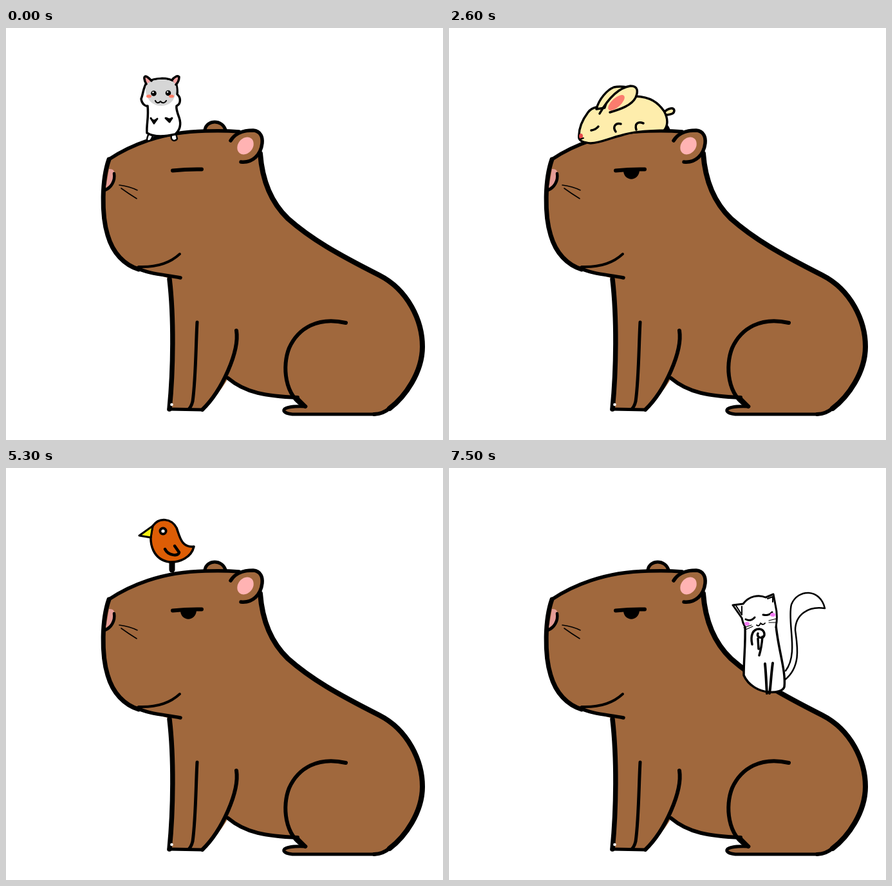
These frames come from a looping animation (679 px wide and 640 px high, 8700 ms). An HTML page:

```html
<!DOCTYPE html>
<html lang="en">
<head>
<meta charset="utf-8">
<title>Capybara and friends</title>
<style>
html, body { margin: 0; width: 100%; height: 100%; overflow: hidden; background: #fff; }
svg { display: block; width: 679px; height: 640px; }
path, ellipse, circle { stroke-linecap: round; stroke-linejoin: round; }
.ink { stroke: #000; }
.line { fill: none; stroke: #000; }
.bare { stroke: none; }

/* hard cuts: every value holds until the next key */
.cut { opacity: 0; animation: 8.7s step-end infinite; }
.eye { animation-name: eye; }
.hamster { animation-name: hamster; }
.turtle { animation-name: turtle; }
.bunny { animation-name: bunny; }
.baby { animation-name: baby; }
.bird { animation-name: bird; }
.chirp { animation-name: chirp; }
.cat { animation-name: cat; }
@keyframes eye {
  0%, 57.471%, 83.908% { opacity: 0; }
  2.299%, 60.92%, 86.207%, 100% { opacity: 1; }
}
@keyframes hamster { 0% { opacity: 1; } 16.092%, 100% { opacity: 0; } }
@keyframes turtle { 0%, 29.885%, 100% { opacity: 0; } 16.092% { opacity: 1; } }
@keyframes bunny { 0%, 43.678%, 100% { opacity: 0; } 29.885% { opacity: 1; } }
@keyframes baby { 0%, 60.92%, 100% { opacity: 0; } 43.678% { opacity: 1; } }
@keyframes bird { 0%, 74.713%, 100% { opacity: 0; } 60.92% { opacity: 1; } }
@keyframes chirp { 0%, 83.908%, 100% { opacity: 0; } 74.713% { opacity: 1; } }
@keyframes cat { 0% { opacity: 0; } 83.908%, 100% { opacity: 1; } }
</style>
</head>
<body>
<svg viewBox="0 0 679 640">
  <g class="cut baby ink" stroke-width="3.5" fill="#cf966a">
    <path d="M464 163C466 157 478 157 480 163"/>
    <path d="M417 180C434 168 458 161 484 164L496 178C500 200 517 221 540 232C562 243 573 252 572 270C571 296 555 320 545 357L536 357L530 354C526 340 532 330 527 317C508 316 490 307 478 295L467 309L454 307C454 280 453 260 451 242C432 241 420 230 417 214C415 203 414 190 417 180Z"/>
    <path class="line" d="M463 262C464 280 463 295 460 308M488 265C486 282 480 292 468 309M478 295C490 309 510 317 537 321M536 300C539 318 538 335 535 357M545 357C552 330 557 318 565 300M438 239L454 241M432 233Q439 236 446 234"/>
    <path d="M482 167C484 161 497 162 497 169C497 176 491 180 486 179"/>
    <ellipse class="bare" cx="489" cy="171.500" rx="4" ry="5" transform="rotate(25 489 171.500)" fill="#ffb3b3"/>
    <path class="line" d="M450 183L467 182"/>
    <circle class="bare" cx="460" cy="185" r="3.500" fill="#000"/>
    <path class="line" d="M417 192Q423 191 422 185"/>
    <path class="line" stroke-width="1" d="M424 191L433 194M424 193L432 199"/>
  </g>

  <g id="capybara">
    <path class="ink" fill="#a0683d" stroke-width="5" d="M309 158C312 142 336 142 341 158"/>
    <path fill="#a0683d" d="M160 204C190 184 240 161 310 160L360 160L394 195C398 236 411 270 438 296C474 328 515 351 580 384C625 407 647 455 647 495C647 535 620 573 596 591Q585 600 572 600L445 600C425 597 430 586 465 588L453 575C415 574 380 569 345 544C335 562 320 580 305 593L254 592C260 540 261 450 254 389L206 375C184 368 166 350 158 322C148 290 149 235 160 204Z"/>
    <path class="line" stroke-width="5.500" d="M160 204C190 184 240 161 310 160Q340 159 362 161"/>
    <path class="line" stroke-width="7" d="M160 204C149 235 148 290 158 322C166 350 184 368 206 375"/>
    <path class="line" stroke-width="5.500" d="M204 373C222 382 245 383 271 388"/>
    <path class="line" stroke-width="8" d="M395 195C398 236 411 270 438 296C474 328 515 351 580 384C625 407 647 455 647 495C647 535 620 573 596 591"/>
    <path class="line" stroke-width="6" d="M597 590Q585 600 572 600"/>
    <path class="line" stroke-width="5" d="M573 600L445 600C425 598 424 586 466 588L453 575"/>
    <path class="line" stroke-width="6" d="M345 544C372 567 405 572 453 574"/>
    <path class="line" stroke-width="7.500" d="M254 390C261 450 260 530 254 592"/>
    <path class="line" stroke-width="5" d="M253 592L305 593M297 457C295 490 295 545 290 580Q288 588 284 592"/>
    <path class="line" stroke-width="6" d="M358 470C363 502 336 563 305 593"/>
    <path class="line" stroke-width="6" d="M528 458C485 448 454 466 440 497C429 524 432 572 465 588"/>
    <circle cx="257.500" cy="585" r="2.300" fill="#fff"/>
    <path class="line" stroke-width="4" d="M270 351C254 366 232 372 206 371"/>
    <path fill="#a0683d" d="M349 175C358 157 376 158 384 158C396 159 400 169 399 179C397 197 383 210 364 209Z"/>
    <path class="line" stroke-width="5.500" d="M349 175C358 160 374 159 384 159C396 160 399 170 398 179C396 197 383 210 365 208"/>
    <ellipse cx="372" cy="183" rx="11.500" ry="14.500" transform="rotate(38 372 183)" fill="#ffb3b3"/>
    <path fill="#e59c96" d="M160 219Q168 218 169 226Q168 241 155 248Z"/>
    <path class="line" stroke-width="4.500" d="M168 226C170 238 163 248 154 252"/>
    <path class="line" stroke-width="1.600" d="M176 244Q192 246 204 252M179 249Q190 257 203 265"/>
    <path class="line" stroke-width="6" d="M259 221.500Q282 219 304 219.500"/>
    <path class="cut eye" d="M271 222L296 221C295 239 272 239 271 222Z"/>
  </g>

  <g class="cut hamster ink" stroke-width="3.500" fill="#fff">
    <path d="M221 166C217 176 220 177 225 174L229 166M257 166C255 176 263 177 266 172L264 164" stroke-width="2.500"/>
    <path d="M219 84C213 92 213 104 210 110C211 119 218 122 220 121C222 138 218 150 219 163C232 171 250 168 263 165C273 156 271 145 269 139C266 131 264 126 265 121C272 118 272 108 266 103C267 95 265 90 264 84C250 76 232 77 219 84Z"/>
    <path class="bare" fill="#d6d6d6" d="M219 86C232 78 252 78 263 86C267 97 263 108 257 115C247 124 232 122 224 114C217 106 215 95 219 86Z"/>
    <path fill="#f5a3a3" d="M218 87C214 80 214 75 217 75C221 76 224 80 226 82M258 81C261 76 267 73 269 76C269 81 266 86 264 88"/>
    <g class="bare">
      <circle cx="229.500" cy="101.500" r="4.300" fill="#000"/>
      <circle cx="252" cy="101" r="4.300" fill="#000"/>
      <circle cx="228.500" cy="100" r="1.300"/>
      <circle cx="251" cy="99.500" r="1.300"/>
      <ellipse cx="222" cy="106" rx="4" ry="2.500" fill="#ff7d66"/>
      <ellipse cx="257" cy="106" rx="4" ry="2.500" fill="#ff7d66"/>
    </g>
    <path class="line" stroke-width="2.200" d="M232 113Q235 119 240 114Q245 119 249 113"/>
    <path class="line" stroke-width="3" d="M225 140L230 148L235 141M248 140L254 146L258 140"/>
    <path fill="#000" stroke-width="1" d="M225 141L230 143L234 141L230 149ZM249 139L254 141L258 139L255 146Z"/>
  </g>

  <g class="cut turtle ink" stroke-width="4" fill="#087508">
    <path d="M213 172C202 175 188 175 181 168C171 158 175 139 187 136C200 133 204 148 208 151L216 153Z"/>
    <path d="M221 168C217 179 222 188 228 188C236 188 239 177 238 168ZM265 164C267 176 276 180 284 178C291 175 290 165 287 160Z"/>
    <path fill="#58300c" d="M212 162C214 170 223 168 232 168C242 168 248 163 259 163C270 163 285 164 290 156L290 149L216 154Z"/>
    <path fill="#b26205" d="M213 160C219 139 234 127 253 127C277 127 290 140 291 152C278 158 269 153 259 157C244 164 230 159 213 163Z"/>
    <path class="line" stroke-width="2" d="M243 140L262 139L268 148L258 156M243 140L235 149L244 160M235 149L216 152M243 140L235 131M262 139L272 131M268 148L289 145"/>
    <circle class="bare" cx="193" cy="153" r="4" fill="#000"/>
    <path class="line" stroke-width="2" d="M183 164Q191 165 201 163"/>
  </g>

  <g class="cut bunny ink" stroke-width="3.500" fill="#feedac">
    <path d="M334 131C341 124 349 123 350 128C350 134 344 134 338 135"/>
    <path d="M202 171C201 158 207 143 216 131C223 122 229 124 233 122L290 106C313 107 325 116 334 129C342 143 339 154 334 159C305 160 285 161 267 167C247 172 237 178 220 179C210 178 203 176 202 171Z"/>
    <path d="M229 126C233 110 246 96 256 92C265 90 271 91 277 92L242 124Z"/>
    <path class="bare" d="M243 126C248 108 263 92 283 90C295 91 295 99 291 107C284 121 267 127 250 131Z"/>
    <path class="line" d="M234 133C246 112 261 93 282 90C294 90 294 99 290 108C284 120 267 126 250 131"/>
    <ellipse class="bare" cx="260" cy="116" rx="16" ry="7" transform="rotate(-42 260 116)" fill="#fb7c6e"/>
    <path class="line" d="M221 159Q228 158 232 153M259 161C254 154 258 147 267 149M291 158C288 148 294 145 302 148"/>
    <ellipse class="bare" cx="205" cy="168" rx="3" ry="4" fill="#e64949"/>
    <path class="line" stroke-width="2" d="M203 173L209 171"/>
  </g>

  <g class="cut bird ink" stroke-width="3.500" fill="#dd5d05">
    <path class="line" stroke-width="9" d="M258 146V158"/>
    <path d="M228 90C238 76 257 78 265 93C270 106 272 124 292 122C288 139 270 147 254 146C231 143 219 120 228 90Z"/>
    <path fill="#f5f011" stroke-width="3" d="M228 90L207 105L225 108Z"/>
    <circle class="bare" cx="244" cy="98" r="6.500" fill="#000"/>
    <circle class="bare" cx="244" cy="98" r="2.600" fill="#fff"/>
    <path class="line" stroke-width="4.500" d="M247 126C252 136 268 138 269 131L262 121"/>
  </g>

  <g class="cut chirp ink" stroke-width="3.500" fill="#dd5d05">
    <path class="line" stroke-width="9" d="M257 144V158"/>
    <path d="M225 87C233 74 254 74 262 88C269 103 273 123 292 120C288 137 270 145 254 144C229 141 215 119 225 87Z"/>
    <path fill="#f5f011" stroke-width="3" d="M225 87L202 90L213 97L204 109L221 107Z"/>
    <circle class="bare" cx="241" cy="96" r="6.500" fill="#000"/>
    <circle class="bare" cx="241" cy="96" r="2.600" fill="#fff"/>
    <path class="line" stroke-width="4" d="M247 124C251 134 268 137 269 130L262 121"/>
    <path fill="#fff" stroke-width="2.600" d="M168 83C147 94 119 87 118 60C119 35 140 22 160 23C181 25 191 38 191 55C190 66 186 73 180 78L185 89Z"/>
    <text transform="translate(124 81) rotate(-24)" stroke-width="1" font-family="'Open Sans', sans-serif" font-size="23" font-weight="800" fill="#000">birb~</text>
  </g>

  <g class="cut cat ink" stroke-width="3.500" fill="#fff">
    <path stroke-width="2.500" d="M522 329C548 308 541 275 538 252C538 228 558 214 584 218C577 187 542 187 532 212C525 240 544 288 523 315"/>
    <path d="M460 244C461 275 458 295 458 322C465 338 482 347 497 348C507 349 519 347 521 340C524 316 511 280 508 244"/>
    <path stroke-width="3" d="M460 247Q456 240 455 233L441 213L457 211C466 199 481 196 492 201L504 196L507 212C510 224 510 236 508 247"/>
    <path class="line" stroke-width="2" d="M446 214L455 228L455 215M495 203L503 200L503 208"/>
    <path class="line" stroke-width="3" d="M461 235Q469 239 475 232M488 228Q497 230 502 224"/>
    <path class="line" stroke-width="2" d="M478 244Q482 247 484 241Q488 245 491 241"/>
    <ellipse class="bare" cx="463" cy="242" rx="4" ry="3" fill="#f57cf5"/>
    <ellipse class="bare" cx="503" cy="228" rx="4" ry="3" fill="#f57cf5"/>
    <path class="line" stroke-width="1.200" d="M458 248L470 244M461 251L472 246M497 237L509 234M497 240L509 240"/>
    <path class="line" d="M471 274C468 260 472 250 482 250C490 251 492 259 488 263C482 265 478 261 480 257M487 262C486 276 485 281 482 291M480 265L481 281"/>
    <path class="line" stroke-width="4" d="M491 304C493 325 493 338 494 350M503 303C500 325 500 338 498 350"/>
  </g>
</svg>
</body>
</html>
```
